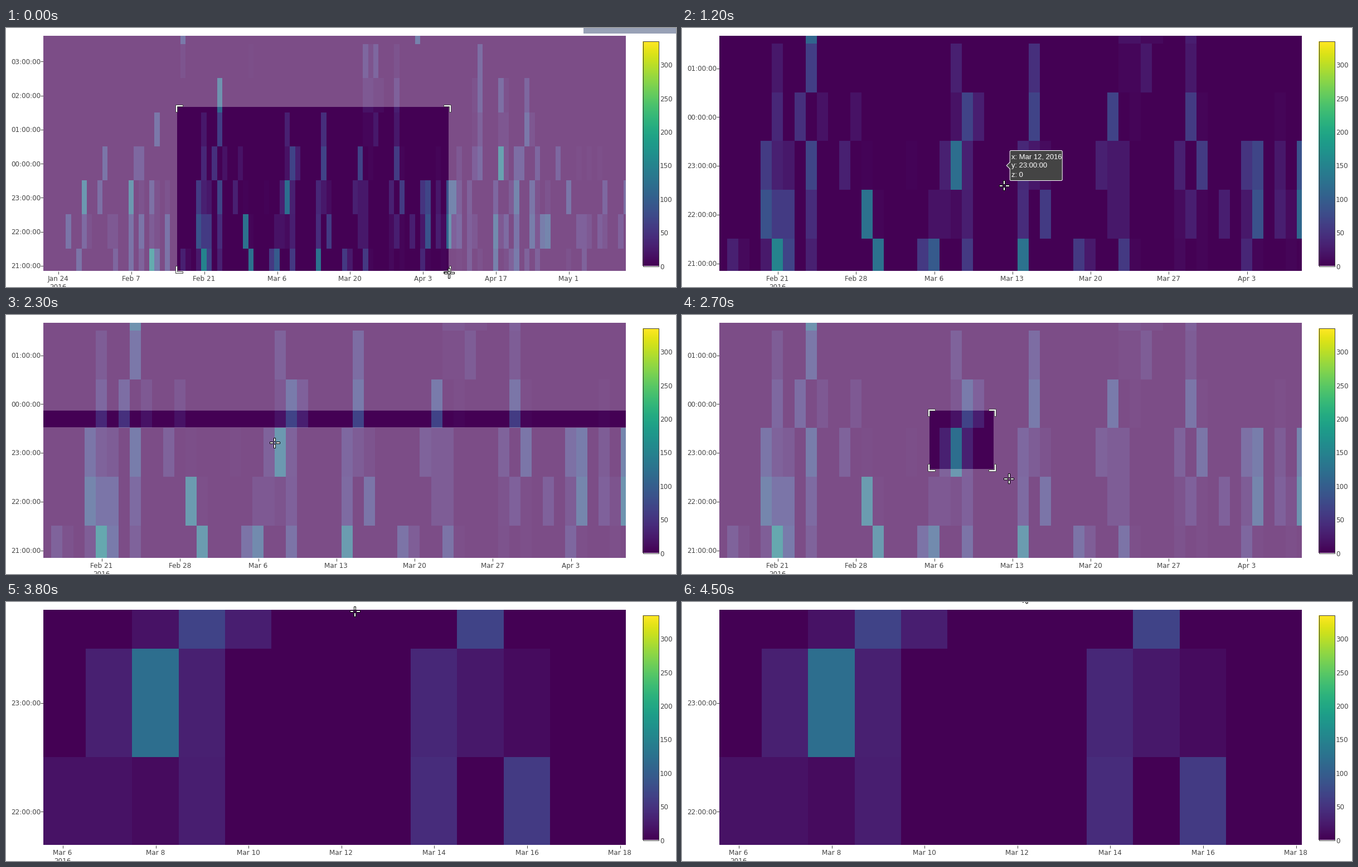
Write a matplotlib script that moves like this. It is 1202 by 466 pixels and loops after 4600 ms.

```python
import numpy as np
import matplotlib.pyplot as plt
from matplotlib.animation import FuncAnimation
from matplotlib.patches import FancyBboxPatch, PathPatch, Polygon, Rectangle
from matplotlib.path import Path

WIDTH, HEIGHT, DPI = 1202, 466, 64
STEP, FRAMES = 100, 46
PX = 72 / DPI
LEFT, RIGHT, TOP, BOTTOM = 67, 1112, 14, 437
INK = "#444444"
FIRST_DAY, LAST_DAY, HOURS = -4, 110, 8
START = np.datetime64("2016-01-24")
MONTHS = "Jan Feb Mar Apr May Jun".split()
Z_MAX = 336

grid = np.zeros((HOURS, LAST_DAY - FIRST_DAY + 1))


def fill(row, levels):
    """Set counts for one hour of the day: {count: days since START}."""
    for count, days in levels.items():
        grid[row, np.array(days) - FIRST_DAY] = count


fill(0, {4: [60, 66, 71, 74, 77], 8: [25, 64, 81, 86, 98], 23: [27, 56],
         30: [16, 24, 31, 79, 87, 90, 92, 101], 36: [11, 70],
         56: [4, 14, 21, 41, 45, 55, 59], 67: [19, 29, 88], 78: [84],
         95: [42], 126: [37, 50], 150: [28], 160: [18]})
fill(1, {4: [37, 66], 10: [6, 19, 44, 64, 74],
         16: [10, 11, 42, 43, 80, 85, 92, 102, 105], 22: [18, 58, 59, 70],
         28: [45, 65, 68, 73, 76, 79, 100, 101, 104, 108],
         42: [5, 31, 50, 77, 86], 57: [2, 14, 16, 21, 28, 29, 52, 88],
         72: [91, 93], 84: [27, 71, 94], 95: [84], 112: [75], 126: [36]})
fill(2, {3: [36, 40], 10: [16, 19, 21, 52, 92, 94],
         21: [29, 51, 58, 59, 73, 87], 29: [28, 34, 43, 45, 57, 64, 77, 79],
         38: [50, 84, 105], 50: [8, 18, 70, 109], 59: [27, 66, 91, 98],
         70: [31, 71], 84: [75, 76, 88], 122: [5, 14, 44]})
fill(3, {4: [60, 66, 73, 100, 102, 104], 16: [32, 35, 44, 77, 86],
         28: [46, 80], 38: [15, 16, 28, 92, 96], 47: [30, 81, 88, 89],
         58: [9, 65], 67: [45, 51, 58], 140: [85]})
fill(4, {6: [59, 60, 80], 14: [85, 86, 91], 22: [28, 61, 65],
         30: [44, 81], 45: [51], 62: [19, 31, 90]})
fill(5, {8: [61, 62, 80, 86], 16: [59, 60], 28: [65], 36: [90],
         48: [81, 85], 110: [31]})
fill(6, {3: [37], 10: [24, 60, 65], 36: [59, 61], 48: [81]})
fill(7, {65: [24], 80: [69]})


class View:
    """Linear map from day and hour row to stage pixels, with its date ticks."""

    def __init__(self, day0, x0, day_px, y0, hour_px, ticks):
        self.day0, self.x0, self.day_px = day0, x0, day_px
        self.y0, self.hour_px, self.ticks = y0, hour_px, ticks

    def x(self, day):
        return self.x0 + (day - self.day0) * self.day_px

    def y(self, row):
        return self.y0 - row * self.hour_px

    def cell(self, x, y):
        return (round(self.day0 + (x - self.x0) / self.day_px),
                round((self.y0 - y) / self.hour_px))


OVERVIEW = View(0, 93.5, 9.346, 427.3, 61.25, range(0, 99, 14))
WEEKS = View(28, 171.5, 20.036, 423, 87.75, range(28, 71, 7))
DAYS = View(42, 101.5, 83.3, 571.9, 195.2, range(42, 55, 2))

# time, x, y of the pointer
TRACK = np.array([
    (0, 794, 440), (100, 795, 441), (200, 795, 441), (300, 794, 440),
    (800, 794, 440), (1400, 469, 204), (1500, 468, 204), (1600, 468, 204),
    (1800, 456, 184), (1900, 447, 176), (2000, 444, 172), (2100, 445, 174),
    (2200, 455, 202), (2300, 481, 229), (3100, 690, 358), (3200, 695, 362),
    (3400, 695, 362), (3600, 675, 220), (3800, 625, 16), (3900, 612, -30),
    (4000, 613, -15), (4100, 612, -13), (4200, 613, -13), (4300, 612, -15),
    (4400, 612, -15), (4500, 611, -15)])


def pointer(time):
    return tuple(np.interp(time, TRACK[:, 0], TRACK[:, k]) for k in (1, 2))


def date_label(day):
    _, month, date = str(START + int(day)).split("-")
    return f"{MONTHS[int(month) - 1]} {int(date)}"


def hour_label(row):
    return f"{(21 + row) % 24:02d}:00:00"


fig = plt.figure(figsize=(WIDTH / DPI, HEIGHT / DPI), dpi=DPI, facecolor="white")
ax = fig.add_axes([0, 0, 1, 1])


def write(x, y, text, ha="center", size=12, color=INK, font="DejaVu Sans", z=3):
    ax.text(x, y, text, ha=ha, va="baseline", fontsize=size * PX, color=color,
            family=font, zorder=z)


def line(xs, ys):
    ax.plot(xs, ys, color=INK, lw=PX, solid_capstyle="butt", zorder=3)


def shape(points, face="white", edge="black", width=1, z=9):
    ax.add_patch(Polygon(points, closed=True, fc=face, ec=edge, lw=width * PX,
                         joinstyle="miter", zorder=z))


def draw_heatmap(view):
    image = ax.imshow(
        grid[::-1], cmap="viridis", vmin=0, vmax=Z_MAX, aspect="auto",
        interpolation="nearest", zorder=1,
        extent=(view.x(FIRST_DAY - .5), view.x(LAST_DAY + .5),
                view.y(-.5), view.y(HOURS - .5)))
    image.set_clip_path(Rectangle((LEFT, TOP), RIGHT - LEFT, BOTTOM - TOP,
                                  transform=ax.transData))


def draw_axes(view):
    for row in range(HOURS):
        y = view.y(row)
        if TOP < y < BOTTOM:
            line([62, 67], [np.floor(y) + .5] * 2)
            write(62, y + 5, hour_label(row), "right")
    for k, day in enumerate(view.ticks):
        x = view.x(day)
        line([np.floor(x) + .5] * 2, [438, 443])
        write(x, 455, date_label(day))
        if k == 0:
            write(x, 470.5, "2016")


def draw_colorbar():
    ax.imshow(np.linspace(1, 0, 256)[:, None], cmap="viridis", aspect="auto",
              extent=(1142, 1171, 428, 24), zorder=1)
    ax.add_patch(Rectangle((1142.5, 23.5), 28, 405, fill=False, ec=INK, lw=PX,
                           zorder=2))
    for value in range(0, 301, 50):
        write(1173, 433.5 - value * 1.207, str(value), "left")


def draw_mask(l, t, r, b, corners=True):
    outer = [(LEFT, TOP), (RIGHT, TOP), (RIGHT, BOTTOM), (LEFT, BOTTOM), (LEFT, TOP)]
    hole = [(l, t), (l, b), (r, b), (r, t), (l, t)]
    codes = [Path.MOVETO] + [Path.LINETO] * 3 + [Path.CLOSEPOLY]
    ax.add_patch(PathPatch(Path(outer + hole, codes * 2), fc="white", alpha=.3,
                           lw=0, zorder=4))
    if not corners:
        return
    arm = int(min(b - t, r - l, 20) / 2)
    outline = np.array([(3.5, .5 - arm), (.5, .5 - arm), (.5, .5),
                        (.5 - arm, .5), (.5 - arm, 3.5), (3.5, 3.5)])
    for x, sx in ((l, -1), (r, 1)):
        for y, sy in ((t, -1), (b, 1)):
            shape(outline * (sx, sy) + (x, y), edge=INK, z=5)


def draw_tooltip(view, x, y):
    day, row = view.cell(x, y)
    lines = [f"x: {date_label(day)}, 2016", f"y: {hour_label(row)}",
             f"z: {grid[row, day - FIRST_DAY]:.0f}"]
    tip, mid = view.x(day + .5), view.y(row)
    l, w = tip + 6, 87 + 7 * (len(lines[0]) - 14)
    ax.add_patch(FancyBboxPatch(
        (l, mid - 27), w, 54, boxstyle="round,pad=0,rounding_size=2",
        mutation_aspect=1, fc=INK, ec="white", lw=PX, zorder=6))
    shape([(l + 1, mid - 6), (tip, mid), (l + 1, mid + 6)], INK, INK, 0, z=7)
    ax.plot([l, tip, l], [mid - 6, mid, mid + 6], color="white", lw=PX, zorder=7)
    for k, text in enumerate(lines):
        write(l + 3, mid - 12 + 16 * k, text, "left", 13, "white",
              "Liberation Sans", z=8)


def draw_crosshair(x, y):
    arm = np.array([(2.5, -1.5), (9, -1.5), (9, 1.5), (2.5, 1.5)])
    for turn in ((1, 0), (0, 1), (-1, 0), (0, -1)):
        c, s = turn
        shape(arm @ np.array([(c, s), (-s, c)]) + (x + .5, y + .5))


def draw_resize(x, y):
    half = [(-9, 0), (-3, -6), (-3, -2), (3, -2), (3, -6), (9, 0)]
    mirrored = [(-px, -py) for px, py in half[1:-1]]
    shape(np.array(half + mirrored) + (x, y + .5))


def draw_arrow(x, y):
    outline = [(0, 0), (0, 16), (3.8, 12.5), (6.2, 18), (9, 17), (6.6, 11.4), (11, 11)]
    shape(np.array(outline) + (x + .5, y))


def update(frame):
    time = frame * STEP
    ax.cla()
    ax.set_axis_off()
    x, y = pointer(time)
    view = OVERVIEW if time < 600 else WEEKS if time < 3500 else DAYS
    draw_heatmap(view)
    draw_axes(view)
    draw_colorbar()
    if time < 900:
        ax.add_patch(Rectangle((1036, 0), 166, 9.5, fc="#98a1b6", lw=0, zorder=2))

    if time < 600:
        draw_mask(307, 141.5, 794, BOTTOM)
    elif time == 2300:
        draw_mask(LEFT, 172, RIGHT, 202, corners=False)
    elif 2300 < time < 3500:
        draw_mask(444, 172, *pointer(time - STEP))
    if 1200 <= time <= 2000:
        draw_tooltip(view, x, y)

    if 300 <= time < 900:
        draw_resize(x, y)
    elif time < 3900:
        draw_crosshair(x, y)
    else:
        draw_arrow(x, y)
    ax.set(xlim=(0, WIDTH), ylim=(HEIGHT, 0))


anim = FuncAnimation(fig, update, frames=FRAMES, interval=STEP, repeat=True,
                     repeat_delay=0, init_func=lambda: None)
plt.show()
```
